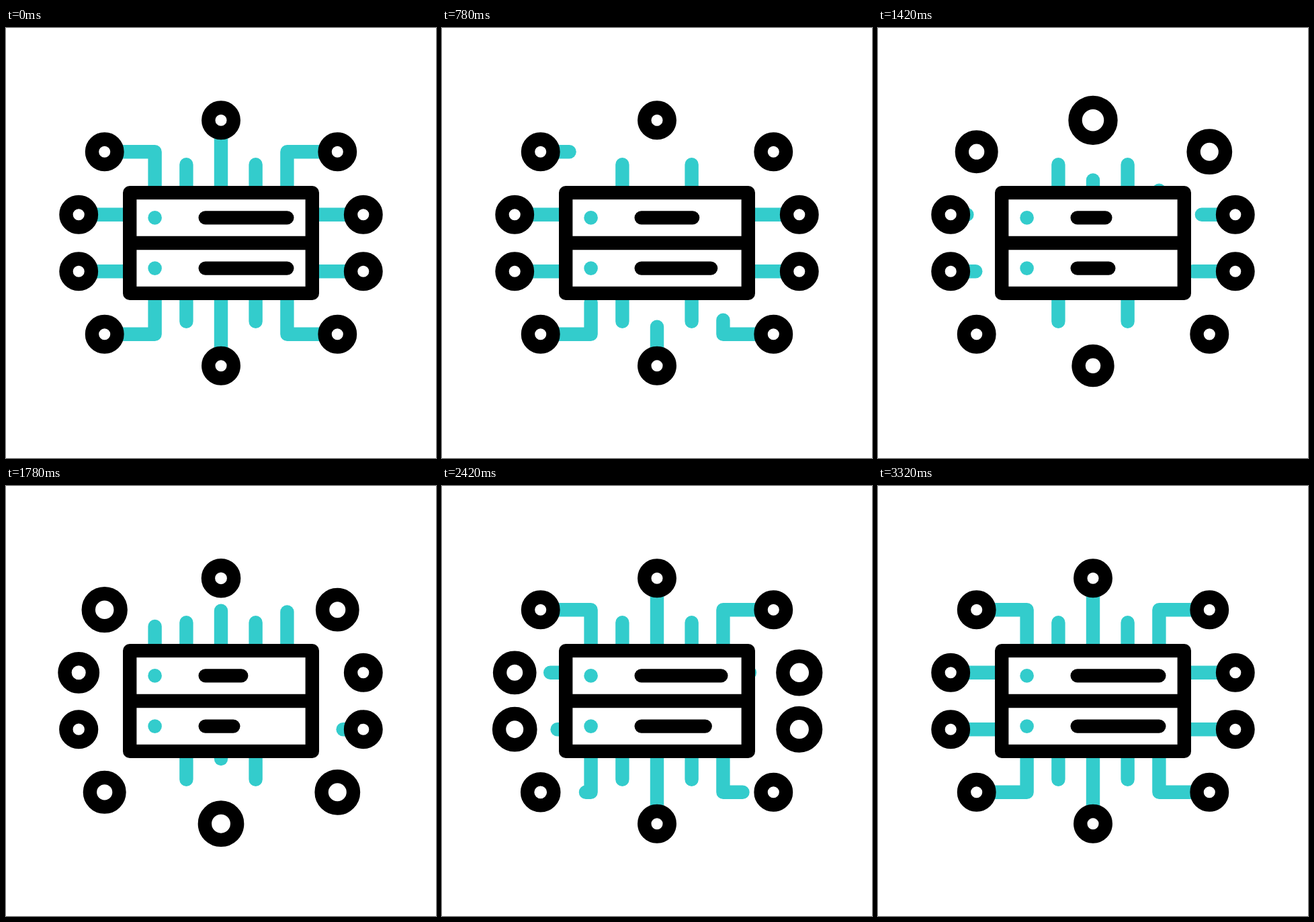
Animation of 640x640 px, one loop 3.6 s. Source, as an HTML page:

```html
<!DOCTYPE html>
<html lang="en">
<head>
<meta charset="utf-8">
<title>Server network</title>
<style>
  html, body { margin: 0; width: 100%; height: 100%; overflow: hidden; background: #fff; }
  svg { display: block; width: 100vw; height: 100vh; }
  path, rect, .ring { stroke: #000; stroke-width: 20.4; stroke-linecap: round; stroke-linejoin: round; }
  path { fill: none; }
  rect, .ring { fill: #fff; }
  .pin, .wire { stroke: #33cccc; }
  .dot { fill: #33cccc; }

  .wire, .ring, .bar { animation: 3600ms infinite; animation-delay: var(--delay); }
  .wire { stroke-dasharray: 100 220; animation-name: wire; animation-timing-function: linear; }
  .ring { r: 18.75px; animation-name: pulse; animation-timing-function: cubic-bezier(.37, 0, .63, 1); }
  .bar { stroke-dasharray: 121.6 260; animation-name: bar; animation-timing-function: cubic-bezier(.37, 0, .63, 1); }

  /* slips out into the ring, then grows again from the box */
  @keyframes wire {
    0% { stroke-dashoffset: 0; }
    17.639% { stroke-dashoffset: -101; }
    17.64%, 34.72% { stroke-dashoffset: 101; }
    56.53%, 100% { stroke-dashoffset: 0; }
  }
  @keyframes pulse {
    0%, 28.89%, 100% { r: 18.75px; }
    14.44% { r: calc(18.75px + var(--grow)); }
  }
  @keyframes bar {
    0%, 3.19% { stroke-dashoffset: 0; }
    37.36%, 42.22% { stroke-dashoffset: 80; }
    70.83%, 100% { stroke-dashoffset: 0; }
  }
</style>
</head>
<body>
<svg viewBox="0 0 640 640">
  <path class="pin" d="M268.4 203.2V436.8M371.6 203.2V436.8"/>
  <g id="wires"></g>
  <g id="rings"></g>
  <rect x="184.2" y="245.1" width="271.6" height="149.8"/>
  <path d="M184.2 320H455.8"/>
  <g id="rows"></g>
</svg>
<script>
const MID = 320;

// Each shape is mirrored about the middle by the signs sx and sy.
const upright = sy => ({
  d: `M${MID} ${MID + 75 * sy}v${88 * sy}`,
  cx: MID, cy: MID + 182.7 * sy, lag: -80
});

const corner = (sx, sy) => {
  const cy = MID + 135.8 * sy;
  return {
    d: `M${MID + 98.4 * sx} ${MID + 75 * sy}V${cy}H${MID + 155 * sx}`,
    cx: MID + 173.3 * sx, cy, lag: 20
  };
};

const side = (sx, sy) => {
  const cy = MID + 42.2 * sy;
  return { d: `M${MID + 136 * sx} ${cy}h${57 * sx}`, cx: MID + 211.8 * sx, cy, lag: 0 };
};

// in the order in which they move
const nodes = [
  upright(-1), corner(1, -1), corner(-1, -1),
  upright(1), corner(1, 1), corner(-1, 1),
  side(-1, -1), side(-1, 1), side(1, -1), side(1, 1)
];

function add(parent, tag, attrs, delay = 0) {
  const el = document.createElementNS('http://www.w3.org/2000/svg', tag);
  for (const name in attrs) el.setAttribute(name, attrs[name]);
  el.style.setProperty('--delay', delay + 'ms');
  return document.getElementById(parent).appendChild(el);
}

nodes.forEach(({ d, cx, cy, lag }, i) => {
  add('wires', 'path', { class: 'wire', d, pathLength: 100 }, 142 * i);
  const ring = add('rings', 'circle', { class: 'ring', cx, cy }, 892 + 120 * i + lag);
  ring.style.setProperty('--grow', i % 6 ? '5.8px' : '8.3px');
});

[-1, 1].forEach((sy, i) => {
  const y = MID + 37.6 * sy;
  add('rows', 'circle', { class: 'dot', cx: 221.6, cy: y, r: 10.3 });
  add('rows', 'path', { class: 'bar', d: `M296.7 ${y}h121.6` }, 275 * i);
});
</script>
</body>
</html>
```
